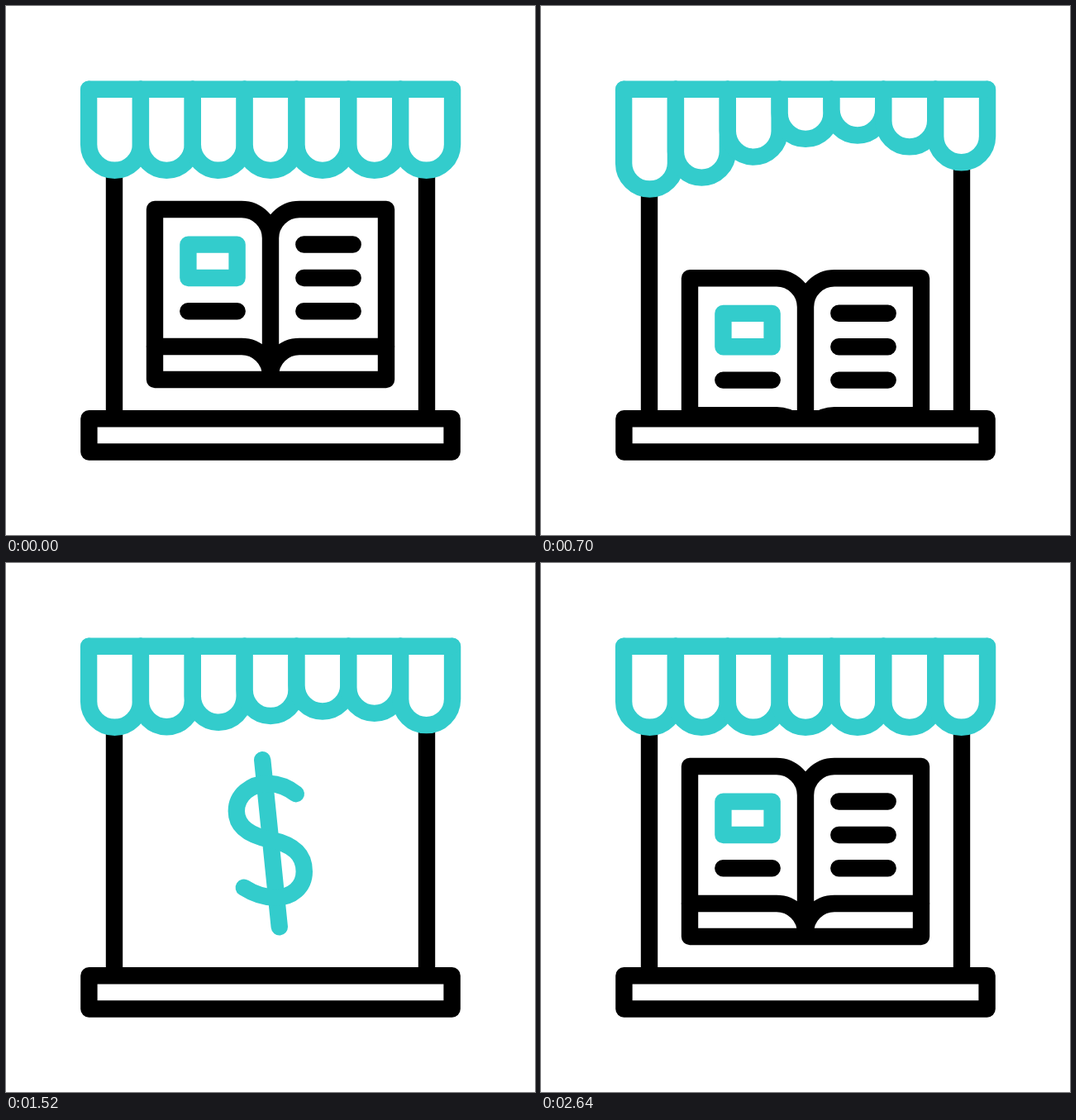
These frames come from a looping animation (640 by 640 pixels, 2700 ms). An HTML page:

```html
<!DOCTYPE html>
<html lang="en">
<head>
<meta charset="utf-8">
<title>Book stall</title>
<style>
  html, body { margin: 0; width: 100%; height: 100%; overflow: hidden; background: #fff; }
  svg { display: block; width: 100vw; height: 100vh; }
  .ink, .teal { fill: none; stroke-width: 20.4; stroke-linecap: round; stroke-linejoin: round; }
  .ink { stroke: #000; }
  .teal { stroke: #33cccc; }
  .solid { fill: #fff; }
</style>
</head>
<body>
<svg viewBox="0 0 640 640">
  <defs>
    <clipPath id="window"><rect x="142" y="180" width="357" height="316"/></clipPath>
  </defs>

  <g clip-path="url(#window)">
    <g id="book">
      <path class="ink" d="M320 452V281A35 35 0 0 0 285 246H180V452H460V246H355A35 35 0 0 0 320 281"/>
      <path class="ink" d="M180 412H285A35 35 0 0 1 320 447A35 35 0 0 1 355 412H460"/>
      <path class="ink" d="M220.3 369.3H279.7M360.3 288.5H419.7M360.3 329H419.7M360.3 369.3H419.7"/>
      <rect class="teal" x="220.4" y="288.6" width="59.2" height="40.4"/>
    </g>
    <g id="dollar">
      <g transform="rotate(5.8) translate(-320.7 -337)">
        <path class="teal" d="M310.4 236L331 438"/>
        <path class="teal" d="M351 277C342 270 331 265 318 264.5C296 264.5 279 279 279 298C279 316 294 327 320 332.5C347 338 361 350 361 371C361 390 346 402.5 326 402.5C313 402.5 299 397.5 288 390.5"/>
      </g>
    </g>
  </g>

  <path class="ink" d="M131 150V499.3M509 150V499.3"/>
  <rect class="ink solid" x="100.4" y="499.3" width="439.2" height="40.2"/>

  <g id="awning"></g>
  <path class="teal" d="M100.5 100.8H539.5"/>
</svg>

<script>
const LOOP = 2700;
const COUNT = 7, PITCH = 62.85, RADIUS = PITCH / 2, LEFT = 100.1, STAGGER = 100;

// Each track lists [time, value] stops
const sway = [[0, 0], [333, -43.5], [715, 23], [1080, -20], [1460, 0]];
const bookY = [[0, 0], [500, -27], [1006, 290], [2255, 290], [2520, -15], [2640, 0]];
const dollarY = [[760, 290], [1260, -27], [1700, 0], [2060, -27], [2440, 290]];
const dollarTilt = [[800, 0], [1080, 7], [1500, -5.9], [1860, 5], [2210, 0]];

const book = document.getElementById('book');
const dollar = document.getElementById('dollar');
const awning = document.getElementById('awning');

const flaps = Array.from({ length: COUNT }, () => {
  const p = document.createElementNS('http://www.w3.org/2000/svg', 'path');
  p.setAttribute('class', 'teal solid');
  return awning.appendChild(p);
});

// Cubic ease with one-third handles: time is linear in the curve parameter
const ease = u => u * u * (3 - 2 * u);

function sample(track, t) {
  if (t <= track[0][0]) return track[0][1];
  for (let i = 1; i < track.length; i++) {
    const [t0, a] = track[i - 1], [t1, b] = track[i];
    if (t < t1) return a + (b - a) * ease((t - t0) / (t1 - t0));
  }
  return track[track.length - 1][1];
}

function draw(t) {
  flaps.forEach((flap, i) => {
    const x = LEFT + i * PITCH;
    const y = 167.4 + sample(sway, t - i * STAGGER);
    flap.setAttribute('d',
      `M${x} 100.8V${y}A${RADIUS} ${RADIUS} 0 0 0 ${x + PITCH} ${y}V100.8`);
  });
  book.setAttribute('transform', `translate(0 ${sample(bookY, t)})`);
  dollar.setAttribute('transform',
    `translate(320.5 ${349 + sample(dollarY, t)}) rotate(${sample(dollarTilt, t)})`);
}

const start = performance.now();
function tick(now) {
  draw(Math.max(0, now - start) % LOOP);
  requestAnimationFrame(tick);
}
draw(0);
requestAnimationFrame(tick);
</script>
</body>
</html>
```
